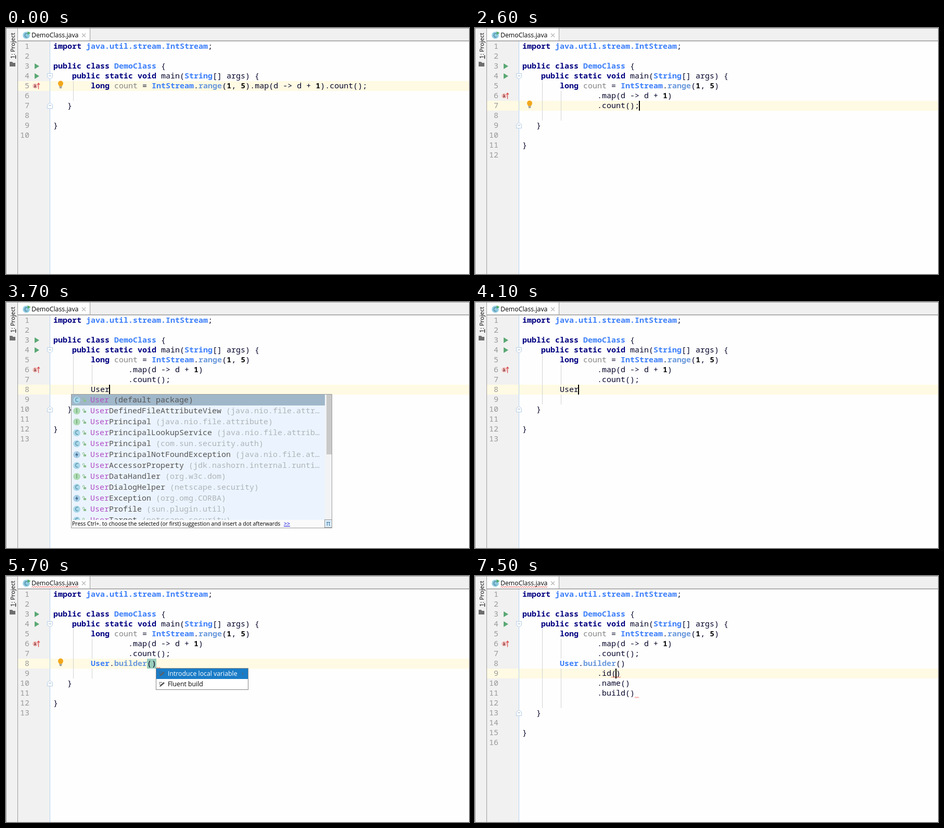
An HTML page for the animation above (8 s loop, 890x473 px).

```html
<!DOCTYPE html>
<html lang="en">
<head>
<meta charset="utf-8">
<title>Editor</title>
<style>
html, body { margin: 0; width: 100%; height: 100%; overflow: hidden; background: #fefefe; }
svg { display: block; width: 890px; height: 473px; }
text { white-space: pre; }
.m { font: 15px "Noto Sans Mono", "DejaVu Sans Mono", monospace; fill: #06062c; }
.u { font: 12.3px "Open Sans", "Noto Sans", sans-serif; fill: #000; }
.s { font-size: 10.5px; }
.n { fill: #999; text-anchor: end; }
.k { font-weight: 700; fill: #000080; }
.c { font-weight: 700; fill: #3c7ffa; }
.r { font-weight: 700; fill: #6a99dc; }
.d { font-weight: 700; fill: #111; }
.g { fill: #858585; }
.p { fill: #b14fc5; }
.i { fill: #555; }
.b { fill: #555; font-weight: 700; }
.q { fill: #aeb3b8; }
.w, .w tspan { fill: #fff; }
</style>
</head>
<body>
<svg id="stage" viewBox="0 0 890 473"></svg>
<script>
const LOOP = 8000, ROW = 19, TOP = 26, LEFT = 91, CH = 9;
const BLUE = '#1a7cc7';
const stage = document.getElementById('stage');

const rowY = n => TOP + (n - 1) * ROW;
const colX = n => LEFT + n * CH;
const rect = (x, y, w, h, fill, more = '') => `<rect x="${x}" y="${y}" width="${w}" height="${h}" fill="${fill}" ${more}/>`;
const frame = (x, y, w, h, fill, line) => rect(x + .5, y + .5, w - 1, h - 1, fill, `stroke="${line}"`);
const path = (d, fill, more = '') => `<path d="${d}" fill="${fill}" ${more}/>`;
const dot = (x, y, r, fill, more = '') => `<circle cx="${x}" cy="${y}" r="${r}" fill="${fill}" ${more}/>`;
const text = (x, y, s, cls, more = '') => `<text x="${x}" y="${y}" class="${cls}" ${more}>${s}</text>`;
// ~kword~ style marks: the letter after the tilde is the colour class
const mark = s => s.replace(/~(.)(.*?)~/g, '<tspan class="$1">$2</tspan>');
const mono = (x, y, s, cls = '', more = '') => text(x, y, mark(s), 'm ' + cls, more);

function wave(x1, x2, y) {
  let d = `M${x1} ${y}`;
  for (let x = x1 + 2, up = true; x <= x2; x += 2, up = !up) d += `L${x} ${up ? y - 2 : y}`;
  return path(d, 'none', 'stroke="#f0504c" stroke-width="1"');
}

// ---- code ----
const head = ['~kimport~ ~cjava.util.stream.IntStream~;', '', '~kpublic class~ ~cDemoClass~ {',
  '    ~kpublic static void~ main(~cString~[] args) {'];
const start = '        ~klong~ ~gcount~ = ~cIntStream~.~rrange~(~d1~, ~d5~)';
const pad = ' '.repeat(16);
const oneLine = [start + '.map(d -&gt; d + ~d1~).count();'];
const chain = [start, pad + '.map(d -&gt; d + ~d1~)', pad + '.count();'];
const typed = s => [...chain, '        ' + s];
const call = '~cUser~.~rbuilder~()';
const built = [...typed(call), pad + '.id()', pad + '.name()', pad + '.build()'];

// ---- small icons ----
function bulb(row) {
  const y = rowY(row) + 5.5;
  return path(`M102.5 ${y + 4.5}Q100 ${y + 2} 100 ${y - 1}A5 5 0 0 1 110 ${y - 1}Q110 ${y + 2} 107.5 ${y + 4.5}Z`, '#f2a71b') +
    rect(102.5, y + 5, 5, 1.3, '#777') + rect(103, y + 7, 4, 1.3, '#777');
}
function lambda(row) {
  const y = rowY(row) + 9.5;
  return dot(56, y, 4.7, '#f3b7b5') +
    path(`M54.5 ${y - 2.5}h1l2 5.5M56 ${y - .5}l-1.8 3.5`, 'none', 'stroke="#6b2d2d" stroke-width="1.1"') +
    path(`M62.5 ${y + 6}V${y - 5}M60.2 ${y - 2.5}l2.3-3 2.3 3`, 'none', 'stroke="#dc4a4e" stroke-width="1.3"');
}
function fold(row, dir) {
  const y = rowY(row) + 9.5, a = y - 5 * dir, b = y + 2 * dir, c = y + 5.5 * dir;
  return path(`M79.5 ${a}H89.5V${b}L84.5 ${c}L79.5 ${b}Z`, '#fff', 'stroke="#b3cde6"') +
    rect(82, y - 1, 5, 1, '#8ba8c4');
}
const run = row => path(`M55 ${rowY(row) + 4}l9 5.5l-9 5.5z`, '#5aa873');
const lens = (x, y) => dot(x, y - 1, 4, 'none', 'stroke="#777" stroke-width="1.2"') +
  path(`M${x + 3} ${y + 2}l4 4`, 'none', 'stroke="#777" stroke-width="1.5"');
const pencil = (x, y, fill) => path(`M${x - 4} ${y + 5}l1-3l7-6l2 2l-7 6z`, fill) +
  path(`M${x - 5} ${y - 3.5}h6M${x - 5} ${y - .5}h3`, 'none', `stroke="${fill}"`);
const kinds = { C: ['#a9d8ea', '#3b6f86'], I: ['#aedbb4', '#3f7a4a'], m: ['#f0b3c0', '#8c4a58'], E: ['#a9cfe8', '#3b5f80'] };
function badge(x, y, kind) {
  const [fill, ink] = kinds[kind];
  const sign = kind === 'E' ? path(`M${x + 1} ${y - 5}l-4 6h3l-1 4l4-6h-3z`, ink)
    : text(x, y + 3.8, kind, 'u', `text-anchor="middle" style="font-size:10.5px;fill:${ink}"`);
  return dot(x, y, 6.8, fill) + sign;
}
const lock = (x, y) => rect(x - 2, y, 5, 4, '#8cbf90') +
  path(`M${x - 3.5} ${y}v-2a1.5 1.5 0 0 1 3 0v2`, 'none', 'stroke="#8cbf90"');

// ---- popups ----
function complete(x, w, h, textX, items, thumb) {
  const y = 177, bar = x + w - 15, foot = y + h - 16;
  let out = frame(x, y, w, h, '#ebf4fe', '#9a9a9a') + rect(x + 1, y + 1, bar - x, 21, '#a0b7c9');
  items.forEach(([kind, label, right], i) => {
    const mid = y + 11 + i * 21;
    if (kind) out += badge(textX - 26, mid + .5, kind) + lock(textX - 11, mid);
    out += mono(textX, mid + 5, label, 'i');
    if (right) out += mono(bar - 6, mid + 5, right, i ? 'q' : 'i', 'text-anchor="end"');
  });
  out += rect(bar + 1, y + 1, 13, h - 17, '#f1f3f5');
  if (thumb) out += rect(bar + 4, y + 1, 10, thumb, '#c9c9c9');
  // the footer covers the lower part of the last item
  out += rect(x + 1, foot, w - 2, 15, '#fafafa');
  out += text(x + 2, foot + 10.5, 'Press Ctrl+. to choose the selected (or first) suggestion and insert a dot afterwards', 'u s');
  out += text(x + 409, foot + 10.5, '&gt;&gt;', 'u s', 'style="fill:#0000e0" text-decoration="underline"');
  return out + frame(bar, foot - 1, 15, 16, '#dcebf7', '#9a9a9a') +
    text(bar + 7.5, foot + 11, 'π', 'u', 'text-anchor="middle" style="fill:#2d6f9e"');
}
const type = (kind, name, pkg) => [kind, `~pUser~${name} ~q(${pkg}~`];
const types = [
  ['C', '~pUser~ ~i(default package)~'],
  type('I', 'DefinedFileAttributeView', 'java.nio.file.attr…'),
  type('I', 'Principal', 'java.nio.file.attribute)'),
  type('C', 'PrincipalLookupService', 'java.nio.file.attrib…'),
  type('C', 'Principal', 'com.sun.security.auth)'),
  type('E', 'PrincipalNotFoundException', 'java.nio.file.at…'),
  type('C', 'AccessorProperty', 'jdk.nashorn.internal.runti…'),
  type('I', 'DataHandler', 'org.w3c.dom)'),
  type('C', 'DialogHelper', 'netscape.security)'),
  type('E', 'Exception', 'org.omg.CORBA)'),
  type('C', 'Profile', 'sun.plugin.util)'),
  type('C', 'Target', 'netscape.security)')
];
const members = [['m', '~bbuilder~()', 'UserBuilder'], ['', '~bclass~'], ['C', '~bUserBuilder~ ~q(User)~'],
  ['', 'lambda'], ['', 'list'], ['', 'new', 'new T()'], ['', 'newArrayList'], ['', 'newHashSet']];

function option(x, y, w, label, on) {
  return (on ? rect(x + 1, y, w - 2, 20, BLUE) : '') + pencil(x + 11, y + 10, on ? '#56606a' : '#555') +
    text(x + 23, y + 14.3, label, on ? 'u w' : 'u');
}
const search = (x, y, w) => frame(x + 1, y + 1, w - 2, 23, '#fff', '#b5b5b5') + lens(x + 11, y + 11) +
  text(x + 22, y + 15.5, 'f', 'u');
const popups = {
  format: () => frame(693, 121, 240, 88, '#fff', '#858585') + option(693, 122, 240, 'Fluent format', true) +
    option(693, 142, 240, 'Split into declaration and assignment') +
    option(693, 162, 240, 'Adjust code style settings') + rect(694, 184, 238, 1, '#ccc') +
    option(693, 187, 240, 'Go to super method'),
  formatFind: () => frame(693, 121, 240, 88, '#fff', '#858585') + search(693, 121, 240) +
    option(693, 145, 240, 'Fluent format', true),
  types: () => complete(125, 502, 258, 162, types, 115),
  members: () => complete(170, 438, 185, 207, members),
  build: () => frame(288, 177, 178, 42, '#fff', '#858585') + option(288, 178, 178, 'Introduce local variable', true) +
    path('M454 185l4 3l-4 3z', '#3f6f98') + option(288, 198, 178, 'Fluent build'),
  buildFind: () => frame(288, 177, 180, 68, '#fff', '#858585') + search(288, 177, 180) +
    option(288, 201, 180, 'Fluent build', true)
};

// ---- time table: each step changes some of the state ----
const gap = [[121, 159], [178, 197]];
const steps = [
  [0, { body: oneLine, row: 5, bulb: 1, lam: 5, guides: [], waves: [] }],
  [500, { bulb: 0, caret: 693 }],
  [700, { caret: 0, sel: 1 }],
  [1300, { bulb: 1, popup: 'format' }],
  [1500, { popup: 'formatFind' }],
  [1900, { body: chain, row: 7, bulb: 0, lam: 6, sel: 0, popup: '', caret: colX(25) }],
  [2100, { guides: [[121, 178]] }],
  [2600, { bulb: 1 }],
  [2700, { body: typed(''), row: 8, bulb: 0, caret: colX(8), guides: [[121, 197]] }],
  [3200, { body: typed('U'), caret: colX(9), guides: gap }],
  [3400, { body: typed('Us'), caret: colX(10) }],
  [3500, { body: typed('Use'), caret: colX(11) }],
  [3600, { body: typed('User'), caret: colX(12) }],
  [3700, { popup: 'types' }],
  [4100, { popup: '' }],
  [4300, { body: typed('User.'), caret: colX(13) }],
  [4400, { popup: 'members' }],
  [5000, { body: typed('User.builder()'), caret: colX(22), popup: '' }],
  [5300, { body: typed(call), pair: 1, tabWave: 1, waves: [[289, 298, 177.5]] }],
  [5700, { popup: 'build', bulb: 1, caret: 0 }],
  [6100, { popup: 'buildFind' }],
  [6400, { body: built, popup: '', bulb: 0, caret: colX(22), waves: [] }],
  [6700, { guides: [[121, 159], [178, 254]], waves: [[262, 280, 195.5], [307, 315, 234.5]] }],
  [7200, { caret: 0 }],
  [7300, { bulb: 1 }],
  [7500, { row: 9, bulb: 0, pair: 0, caret: colX(20) }]
];
const states = [];
steps.forEach(([, change], i) => states.push({ ...states[i - 1], ...change }));

function chrome(s) {
  return rect(0, 0, 22, 473, '#f1f1f1') + rect(23, 0, 867, 25, '#f0f0f0') +
    rect(23, 1, 138, 24, '#fff') + rect(161, 1, 1, 24, '#9a9a9a') +
    rect(0, 0, 890, 1, '#a0a0a0') + rect(0, 0, 1, 473, '#a0a0a0') +
    rect(22, 0, 1, 473, '#9a9a9a') + rect(23, 24, 867, 1.5, '#999') +
    dot(39, 14, 6.8, '#8fcbe2') + text(38.5, 17.8, 'C', 'u', 'text-anchor="middle" style="font-size:10.5px;fill:#35697f"') +
    path('M41.5 6.5l6 3.2l-6 3.2z', '#4fa866') +
    text(49, 18, 'DemoClass.java', 'u') + (s.tabWave ? wave(49, 140, 22) : '') +
    path('M146 10.5l7 7m0-7l-7 7', 'none', 'stroke="#b5b5b5" stroke-width="1.2"') +
    text(0, 0, '<tspan text-decoration="underline">1</tspan>: Project', 'u', 'transform="translate(17 59) rotate(-90)" style="font-size:11.5px"') +
    path('M7 65h5l1.5 2H18v7H7z', '#6e6e6e');
}

function editor(s) {
  const lines = [...head, ...s.body, '', '   }', '', '}', ''];
  const end = s.body.length + 6, y = rowY(s.row);
  let out = rect(23, 25, 61, 448, '#f1f1f1') + rect(23, y, 867, ROW, '#fffae3') +
    rect(84, 25, 1, 448, '#b4d2f2');
  out += rect(129, 102, 1, rowY(end) - 102, '#d2d2d2');
  for (const [a, b] of s.guides) out += rect(165, a, 1, b - a, '#d2d2d2');
  if (s.sel) out += rect(163, 102, 530, ROW, '#5674ab');
  if (s.pair) out += rect(colX(20), 159, 18, ROW, '#99ccbb');
  lines.forEach((line, i) => {
    const base = rowY(i + 1) + 14;
    out += text(45, base, i + 1, 'm n') + mono(LEFT, base, line, s.sel && i === 4 ? 'w' : '');
  });
  out += run(3) + run(4) + fold(4, 1) + fold(end, -1) + lambda(s.lam);
  for (const w of s.waves) out += wave(...w);
  if (s.bulb) out += bulb(s.row);
  if (s.caret) out += rect(s.caret - 1, y, 2, ROW, '#000');
  return out;
}

const t0 = performance.now();
let shown = -1;
function tick(now) {
  const t = Math.max(0, now - t0) % LOOP;
  const i = steps.filter(([at]) => at <= t).length - 1;
  if (i !== shown) {
    const s = states[shown = i];
    stage.innerHTML = rect(0, 0, 890, 473, '#fefefe') + editor(s) + chrome(s) + (s.popup ? popups[s.popup]() : '');
  }
  requestAnimationFrame(tick);
}
tick(t0);
</script>
</body>
</html>
```
